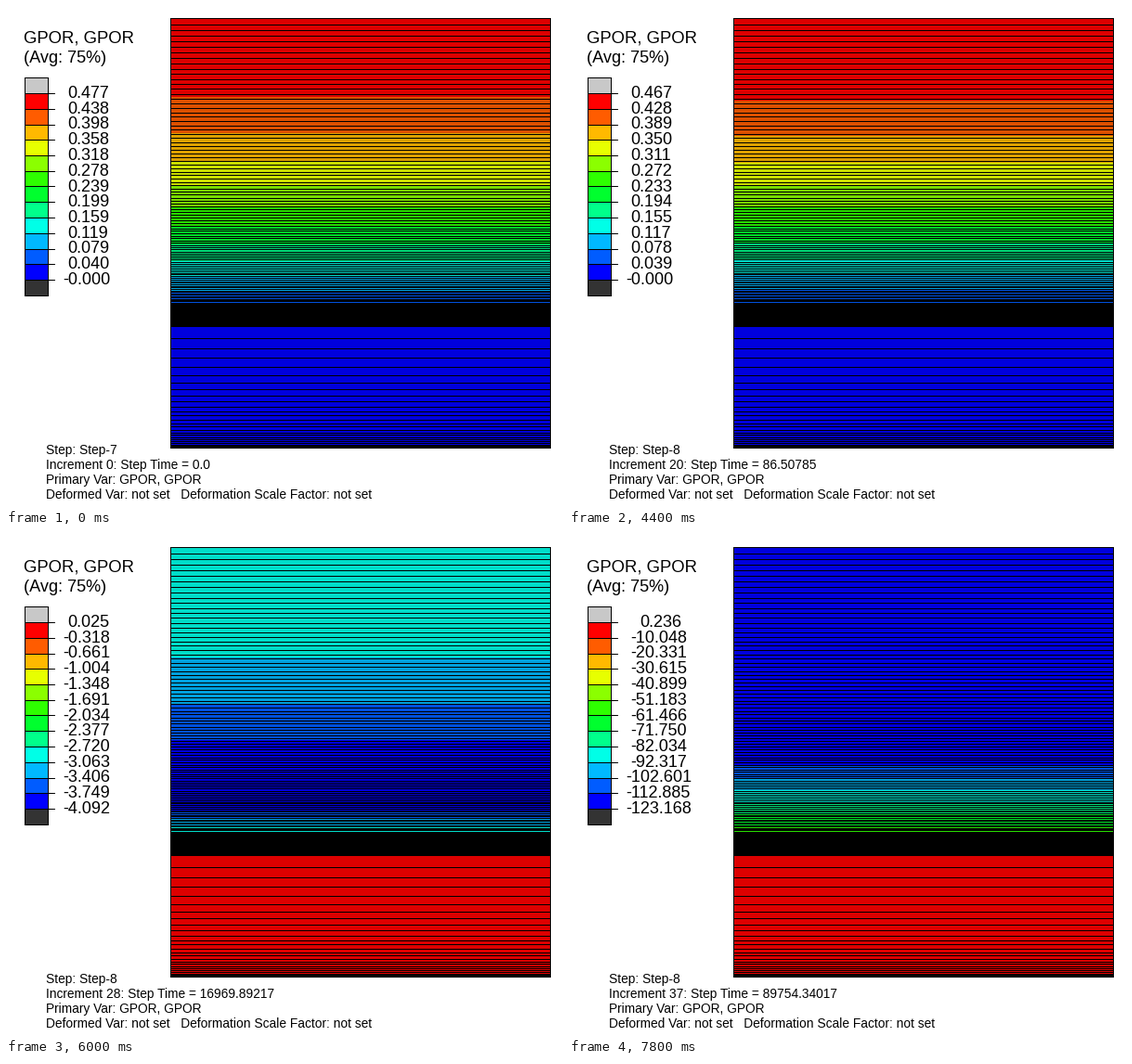
Write a matplotlib script that moves like this. It is 600x540 px and loops after 8 s.

```python
import colorsys

import numpy as np
import matplotlib.pyplot as plt
from matplotlib.animation import FuncAnimation

W, H, DPI = 600, 540, 100
FRAMES, INTERVAL = 40, 200

# Contour block: outer border and the black seam between its two layers
LEFT, RIGHT, TOP, BOTTOM = 177, 586, 13, 476
SEAM_TOP, SEAM_END = 320, 345
Y = np.arange(TOP, BOTTOM + 1)
DEPTH = Y - TOP

# Colour key: a rainbow from red to blue
N = 12
KEY_X0, KEY_X1, KEY_Y, KEY_STEP = 20, 45, 94, 16.75
ABOVE, BELOW = (200, 200, 200), (51, 51, 51)
BANDS = np.array([colorsys.hsv_to_rgb(i / (N - 1) * 2 / 3, 1, 255) for i in range(N)])
SHADE = 0.87


def pressure(bands, hi, lo):
    """Upper layer from its place in the colour key; the lower layer stays at 0."""
    p = hi - np.minimum(bands, N) * (hi - lo) / N
    return np.where(Y < SEAM_TOP, p, 0)


def power(first, p):
    """Band number when limit j is crossed at depth first * j**p."""
    return (DEPTH / first) ** (1 / p)


LOWEST = -0.0002
start = pressure(power(85, 0.54), 0.4774, LOWEST)
rest = pressure(power(88, 0.52), 0.46858, LOWEST)
mid = pressure(power(72, 0.51), 0.23243, -0.23665)
late = pressure(np.minimum(9.77 + (DEPTH / 148) ** 2, N - (Y - 292) / 7), 0.0508, -12.7933)
final = pressure(11 - (Y - 249) / 13, 0.23598, -123.1684)

T_LATE, T_END = 28763.75073, 89754.34017


def step_time(inc):
    """Time steps double up to increment 27, then stay even."""
    if inc < 2:
        return 0.00033 * inc
    if inc <= 27:
        return 0.00033 * (2 ** (inc - 2) + 1)
    return np.interp(inc, [27, 30, 37], [step_time(27), T_LATE, T_END])


# Pressure drop grows as a power of time between these states
drops = np.log(np.maximum(
    [rest * 1e-5, rest * 0.0039, rest * 0.05,
     rest - mid, rest - late, rest - final], 1e-7))
DROP_T = np.log([step_time(i) for i in (10, 20, 22, 26, 30, 37)])
RISE = np.log(0.23598 / 0.0508) / np.log(T_END / T_LATE)


def state(k):
    """Step, increment, time text, pressure rows and key limits."""
    if k < 2:
        p = start + (rest - start) * k / 2
        return 7, k, f"{k}.0", p, p.max(), LOWEST
    inc = k - 2
    t = step_time(inc)
    pos = np.interp(np.log(max(t, 1e-9)), DROP_T, np.arange(len(drops)))
    i = min(int(pos), len(drops) - 2)
    p = rest - np.exp(drops[i] + (drops[i + 1] - drops[i]) * (pos - i))
    hi = max(p.max(), 0.0508 * (t / T_LATE) ** RISE)
    return 8, inc, f"{t:.5f}" if inc else "0.0", p, hi, min(p.min(), LOWEST)


def edges(top, end, size, shrink):
    """Rows of element edges; elements get thinner with depth."""
    y = top
    while y < end:
        yield int(round(y)) - TOP
        y += size - shrink * (y - top)


MESH = [*edges(TOP, SEAM_TOP, 6.5, 0.0168), *range(SEAM_TOP - TOP, SEAM_END - TOP),
        *edges(SEAM_END, 472, 12.5, 0.085), *range(473 - TOP, len(Y))]


def backdrop():
    img = np.full((H, W, 3), 255, np.uint8)
    lines = [int(round(KEY_Y + KEY_STEP * i)) for i in range(-1, N + 2)]
    for y0, y1, c in zip(lines, lines[1:], [ABOVE, *BANDS, BELOW]):
        img[y0:y1, KEY_X0:KEY_X1 + 1] = c
    for y in lines:
        img[y, KEY_X0:KEY_X1 + 1] = 0
    for y in lines[1:-1]:
        img[y, KEY_X1:KEY_X1 + 8] = 0
    img[lines[0]:lines[-1] + 1, [KEY_X0, KEY_X1]] = 0
    return img


BASE = backdrop()

fig = plt.figure(figsize=(W / DPI, H / DPI), dpi=DPI, facecolor="white")
ax = fig.add_axes([0, 0, 1, 1])
ax.axis("off")
picture = ax.imshow(BASE, extent=(0, W, H, 0), interpolation="nearest", aspect="auto")
ax.set_xlim(0, W)
ax.set_ylim(H, 0)


def write(x, y, s, px):
    return ax.text(x, y, s, fontsize=px * 72 / DPI, family="Liberation Sans",
                   color="black", ha="left", va="baseline")


write(19, 40, "GPOR, GPOR", 18.5)
write(19, 61, "(Avg: 75%)", 18.2)
labels = [write(62, 99 + KEY_STEP * i, "", 18) for i in range(N + 1)]
notes = [write(43, 483 + 16 * i, s, 13.8) for i, s in enumerate([
    "", "", "Primary Var: GPOR, GPOR",
    "Deformed Var: not set   Deformation Scale Factor: not set"])]


def draw(k):
    step, inc, time, p, hi, lo = state(k)
    band = np.clip(((hi - p) / (hi - lo) * N).astype(int), 0, N - 1)
    rows = BANDS[band] * SHADE
    rows[MESH] = 0
    img = BASE.copy()
    img[TOP:BOTTOM + 1, LEFT:RIGHT + 1] = rows[:, None]
    img[TOP:BOTTOM + 1, [LEFT, RIGHT]] = 0
    picture.set_data(img)

    # Shorter numbers are padded with spaces on the left
    texts = [f"{v:.3f}" for v in np.linspace(hi, lo, N + 1)]
    width = max(map(len, texts))
    for label, s in zip(labels, texts):
        label.set_text(s)
        label.set_x(61.5 + 5 * (width - len(s)))
    notes[0].set_text(f"Step: Step-{step}")
    notes[1].set_text(f"Increment {inc}: Step Time = {time}")
    return [picture, *labels, *notes]


anim = FuncAnimation(fig, draw, frames=FRAMES, interval=INTERVAL,
                     repeat=True, repeat_delay=0, blit=False)
plt.show()
```
